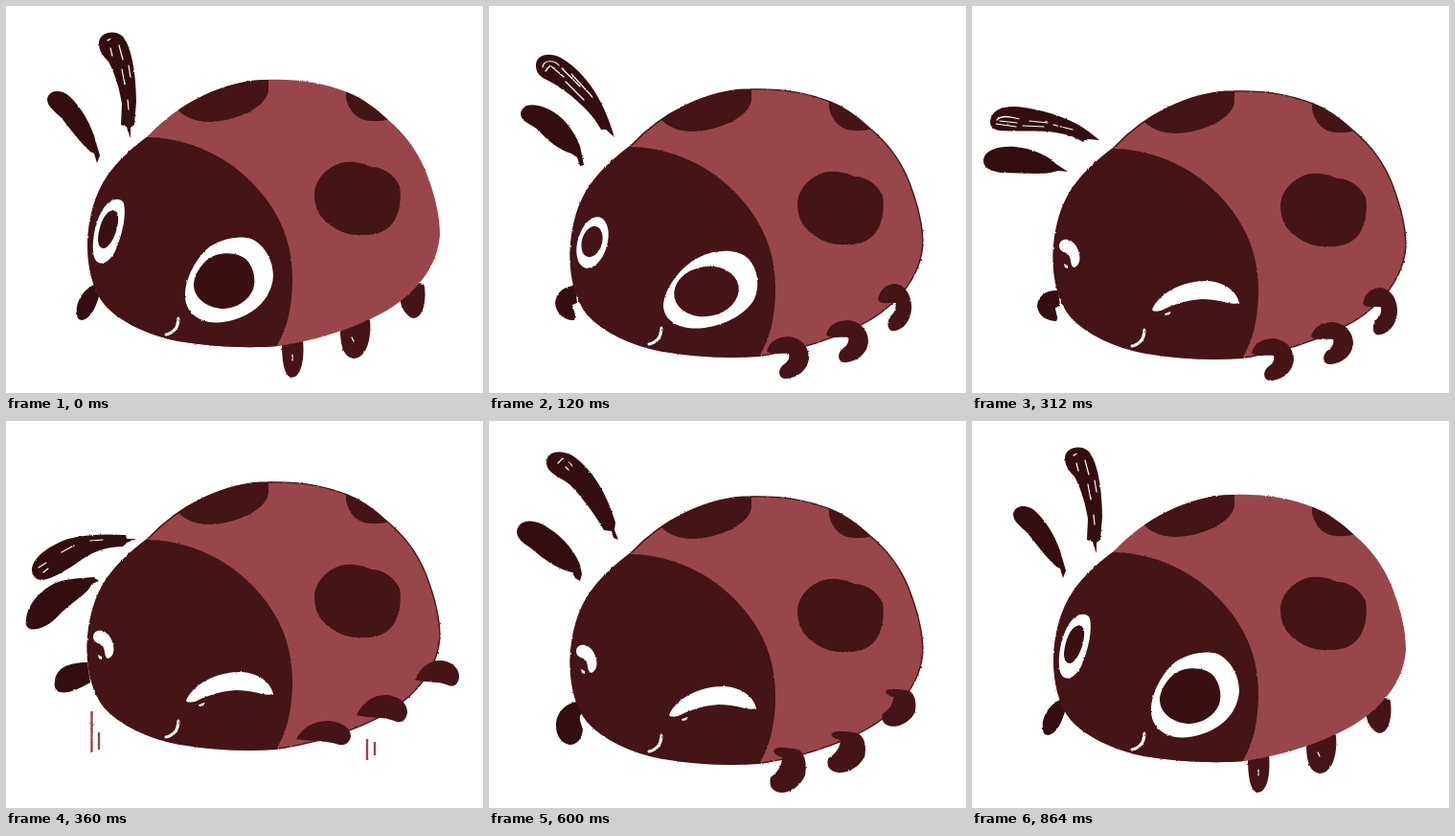
Write an HTML page that moves like this. It is 498 px wide and 404 px high and loops after 960 ms.

```html
<!DOCTYPE html>
<html lang="en">
<head>
<meta charset="utf-8">
<title>Hopping ladybug</title>
<style>
html, body { margin: 0; width: 100%; height: 100%; overflow: hidden; background: #fff; }
svg { display: block; width: 100vw; height: 100vh; }
.dark { fill: #451417; }
.ink { fill: #330d10; }
.pupil { fill: #3a1012; }
.white { fill: #fff; }
.scratch { fill: none; stroke: #fff; stroke-width: 1.2; stroke-linecap: round; }
.dust { fill: none; stroke: #99464a; stroke-width: 2.4; }
</style>
</head>
<body>
<svg viewBox="0 0 498 404">
  <defs>
    <filter id="rough" filterUnits="userSpaceOnUse" x="0" y="0" width="498" height="404" color-interpolation-filters="sRGB">
      <feTurbulence type="fractalNoise" baseFrequency=".3" numOctaves="2" seed="4"/>
      <feDisplacementMap in="SourceGraphic" scale="2" xChannelSelector="R" yChannelSelector="G"/>
    </filter>
    <path id="shell" d="M148 136C164 119 182 105 205 94C228 83 250 77 273 77C303 76 331 80 356 90C372 96 386 107 398 118C415 132 429 150 438 172C447 195 453 217 453 239C451 263 440 286 412 308C388 327 338 347 285 355C250 358 210 355 180 350C149 344 119 330 103 312C90 296 85 272 85 248C86 222 92 197 106 177C117 161 132 148 148 136Z"/>
    <clipPath id="inside"><use href="#shell"/></clipPath>
  </defs>
  <g filter="url(#rough)"><g id="back"></g></g>
  <g id="body">
    <g filter="url(#rough)">
      <use href="#shell" fill="#99464a"/>
      <g class="dark" clip-path="url(#inside)">
        <path d="M60 137H148C200 138 245 165 272 202C292 229 300 258 299 290C298 316 294 336 282 356V380H60Z"/>
        <path d="M180 109L200 70H274V88C273 98 263 107 246 114C224 123 196 125 180 109Z"/>
        <path d="M355 80V96C357 105 361 113 371 118C379 121 391 121 400 118V80Z"/>
        <path d="M322 196C323 180 335 169 349 164C361 161 373 164 381 168C393 168 405 175 411 188C413 201 411 214 406 223C399 236 385 240 370 239C353 240 339 231 329 220C324 213 322 205 322 196Z"/>
      </g>
      <use id="rim" href="#shell" fill="none" stroke="#451417" stroke-width="1.4"/>
      <g id="eyes"></g>
      <path d="M180 326C180 335 175 341 167 343" fill="none" stroke="#fff" stroke-width="3" stroke-linecap="round"/>
    </g>
  </g>
  <g filter="url(#rough)"><g id="front"></g></g>
</svg>
<script>
const $ = id => document.getElementById(id);
const path = (cls, d) => `<path class="${cls}" d="${d}"/>`;
const oval = (cls, [x, y, rx, ry, tilt]) =>
  `<ellipse class="${cls}" cx="${x}" cy="${y}" rx="${rx}" ry="${ry}" transform="rotate(${tilt} ${x} ${y})"/>`;

// Leg shapes, placed by [x, y, scaleX, scaleY]
const HOOK = "M0 15C3 5 10 1 22 0C36 1 44 11 44 22C43 36 31 44 18 44C11 42 12 33 18 29C23 26 24 21 23 18C14 17 4 20 0 15Z";
const FLAT = "M0 19C6 8 16 1 31 0C46 0 57 7 57 16C56 22 52 26 45 25C32 20 16 22 0 19Z";
const CURL = "M4 4C7 -1 17 1 30 3C37 7 39 18 37 30C32 41 22 48 12 48C2 47 -1 40 1 32C8 27 13 20 13 11C9 10 5 8 4 4Z";
const legs = (shape, spots) => spots.map(([x, y, sx = 1, sy = 1]) =>
  `<path class="dark" transform="translate(${x} ${y}) scale(${sx} ${sy})" d="${shape}"/>`).join("");

const WIDE =
  path("white", "M187 302C187 284 199 262 213 251C226 243 243 239 256 243C270 249 279 266 279 282C278 297 270 310 258 318C245 327 228 332 212 330C197 327 187 317 187 302Z" +
    "M91 255C90 240 95 217 106 206C112 201 120 200 123 206C126 219 121 240 114 256C108 267 101 271 95 267C92 264 91 260 91 255Z") +
  path("pupil", "M196 292C196 279 207 264 219 260C232 256 247 259 253 267C259 275 261 286 258 296C253 307 242 315 228 316C211 316 197 306 196 292Z" +
    "M96 243C97 230 102 217 109 214C115 212 118 216 117 225C116 236 111 247 105 252C100 255 96 251 96 243Z");
const SQUINT =
  path("white", "M182 302C183 286 199 262 220 252C237 244 259 243 271 254C281 265 283 282 277 296C268 312 246 323 225 326C203 329 182 321 182 302Z") +
  oval("dark", [227, 288, 34, 26, -10]) +
  oval("white", [108, 237, 15.5, 27.5, 16]) + oval("dark", [107.5, 236, 10.5, 16.5, 16]);
const SHUT = path("white", "M188 305C195 288 219 275 245 275C265 276 277 287 279 298C270 301 260 294 240 294C220 295 206 302 197 306Q189 308 188 305Z" +
  "M201 309L208 307L206 310L202 311Z" +
  "M91 239C91 230 103 229 109 239C114 248 114 258 107 261C102 260 104 252 101 248C98 244 92 246 91 239Z" +
  "M96 257L100 259L100 262L97 261Z");

// dy: body lift; horns: antennae; paw: far front leg
const POSES = [
  { dy: 0, eyes: WIDE,
    horns: "M97 38C98 27 114 24 122 32C132 44 136 75 136 100L134 124L130 127L130 138L127 130L126 126L120 124L121 102C118 85 114 71 107 58C99 50 97 45 97 38Z" +
      "M43 97C45 87 58 87 66 94C78 105 90 124 95 146L98 156L95 164L92 154L88 152C77 142 66 127 58 117C50 109 43 105 43 97Z",
    paw: "M74 321C72 308 83 293 95 290L98 300C94 315 88 326 80 328C75 328 74 325 74 321Z",
    under: "M288 350L310 348C312 370 308 388 298 388C290 386 288 370 288 350Z" +
      "M349 342C350 326 375 321 380 328C382 350 375 368 363 368C352 366 350 355 349 342Z" +
      "M411 304C415 293 435 284 437 293C439 310 435 326 425 326C418 324 412 315 411 304Z",
    scratch: "M106 36L109 34M109 44L111 52M118 41L122 56M121 66L124 82M128 62L130 74M127 98L128 108M299 364L299 370M361 346L363 350" },
  { dy: 10, eyes: SQUINT, rim: 1,
    horns: "M49 62C49 52 60 48 73 53C92 63 113 85 126 122L131 137L122 129L117 129C110 117 104 110 95 102C85 92 70 82 60 77C52 73 49 69 49 62Z" +
      "M33 113C34 103 45 101 58 106C75 112 88 128 95 146L99 166L95 167L92 158L86 154C75 151 60 140 52 130C45 123 34 122 33 113Z",
    paw: "M69 310C70 298 80 292 90 292L92 310L87 312C88 317 92 323 89 328C80 329 70 322 69 310Z",
    legs: legs(HOOK, [[290, 345], [352, 328], [406, 290, .8, 1.12]]),
    scratch: "M56 64C57 55 69 57 73 62M59 68L64 62L78 74M76 65L95 84M86 71L108 95M80 79L99 98" },
  { dy: 12, eyes: SHUT, rim: 1,
    horns: "M19 120C21 107 35 103 55 106C80 110 105 118 123 132L133 140L121 139L116 142C110 138 98 133 80 131C60 130 40 131 28 130C21 128 19 126 19 120Z" +
      "M12 160C14 150 28 146 45 147C65 149 80 157 88 165L100 173L90 172L82 174C70 176 50 174 30 174C18 172 11 168 12 160Z",
    paw: "M68 313C69 301 79 296 90 297L92 313L87 315C87 320 91 325 88 329C79 329 69 324 68 313Z",
    legs: legs(HOOK, [[292, 347], [354, 330], [408, 294, .82, 1.12]]),
    scratch: "M26 119C31 113 42 116 49 118M25 123L46 126M29 120L47 122M60 120L79 122M53 125L75 126M85 124L105 129" },
  { dy: -13, eyes: SHUT, rim: 1,
    horns: "M27 155C28 142 45 130 65 123C85 118 105 118 125 119L126 123L136 123L126 127L122 131C110 131 95 134 80 144C65 155 48 165 38 166C30 166 27 161 27 155Z" +
      "M21 208C22 192 35 177 52 169C65 164 80 164 92 163L97 167L90 170L86 176C78 185 65 192 55 203C45 214 33 219 25 217C21 215 20 212 21 208Z",
    paw: "M51 272C52 258 65 252 85 252L88 273C75 280 65 285 56 283C51 281 50 276 51 272Z",
    legs: legs(FLAT, [[303, 313], [366, 286, .93, 1.12], [427, 250, .81, 1.06]]),
    scratch: "M34 153L42 148M39 158L44 154M58 137L71 130M88 125L101 124",
    dust: "M89.5 303V346M97 325V343M377 332V354M385 335V349" },
  { dy: -16, eyes: SHUT, rim: 1,
    horns: "M43 58C43 46 55 42 70 46C92 58 114 78 130 104L131 113L135 121L127 116L119 113C112 106 95 90 78 83C65 77 45 72 43 58Z" +
      "M24 122C26 111 38 109 52 113C72 122 88 138 95 158L96 168L91 165L88 160C75 158 62 147 50 140C38 135 24 133 24 122Z",
    paw: "M49 270C50 257 65 251 85 252L89 271C77 276 65 280 55 279C50 277 48 274 49 270Z",
    legs: legs(FLAT, [[306, 312, 1, .95], [367, 281, .93, 1.08], [426, 242, .79, 1.06]]),
    scratch: "M59 56L62 52M64 64L67 66M82 68L86 72",
    dust: "M89.5 297V328M97 314V328M377 318V332M385 321V333" },
  { dy: 2, eyes: SHUT, rim: 1,
    horns: "M60 42C62 31 75 30 87 36C105 48 122 72 132 106L131 114L135 124L130 122L128 115L120 114C112 100 98 80 84 66C74 58 59 54 60 42Z" +
      "M29 115C31 104 42 102 54 107C72 116 88 132 95 150L97 160L95 167L90 164L87 158C76 156 62 148 50 138C42 130 29 126 29 115Z",
    paw: "M70 318C70 304 80 295 92 293L98 305C92 308 96 315 98 322C97 332 92 338 84 338C75 336 70 328 70 318Z",
    legs: legs(CURL, [[293, 340], [353, 323, 1.06, .92], [410, 279, .94, .83]]),
    scratch: "M72 44L77 39M80 48L83 51M84 43L87 47" }
];
POSES.push(POSES[0]);

const STEP = 120, LOOP = 960;
let shown = -1, start;

function show(i) {
  if (i === shown) return;
  shown = i;
  const p = POSES[i];
  $("body").setAttribute("transform", `translate(0 ${p.dy})`);
  $("rim").style.display = p.rim ? "" : "none";
  $("eyes").innerHTML = p.eyes;
  $("back").innerHTML = path("ink", p.paw) + (p.under ? path("dark", p.under) : "");
  $("front").innerHTML = path("ink", p.horns) + (p.legs || "") +
    path("scratch", p.scratch) + (p.dust ? path("dust", p.dust) : "");
}

function tick(now) {
  start ??= now;
  const t = (now - start) % LOOP;
  show(Math.min(Math.floor(t / STEP), POSES.length - 1));
  requestAnimationFrame(tick);
}

show(0);
requestAnimationFrame(tick);
</script>
</body>
</html>
```
